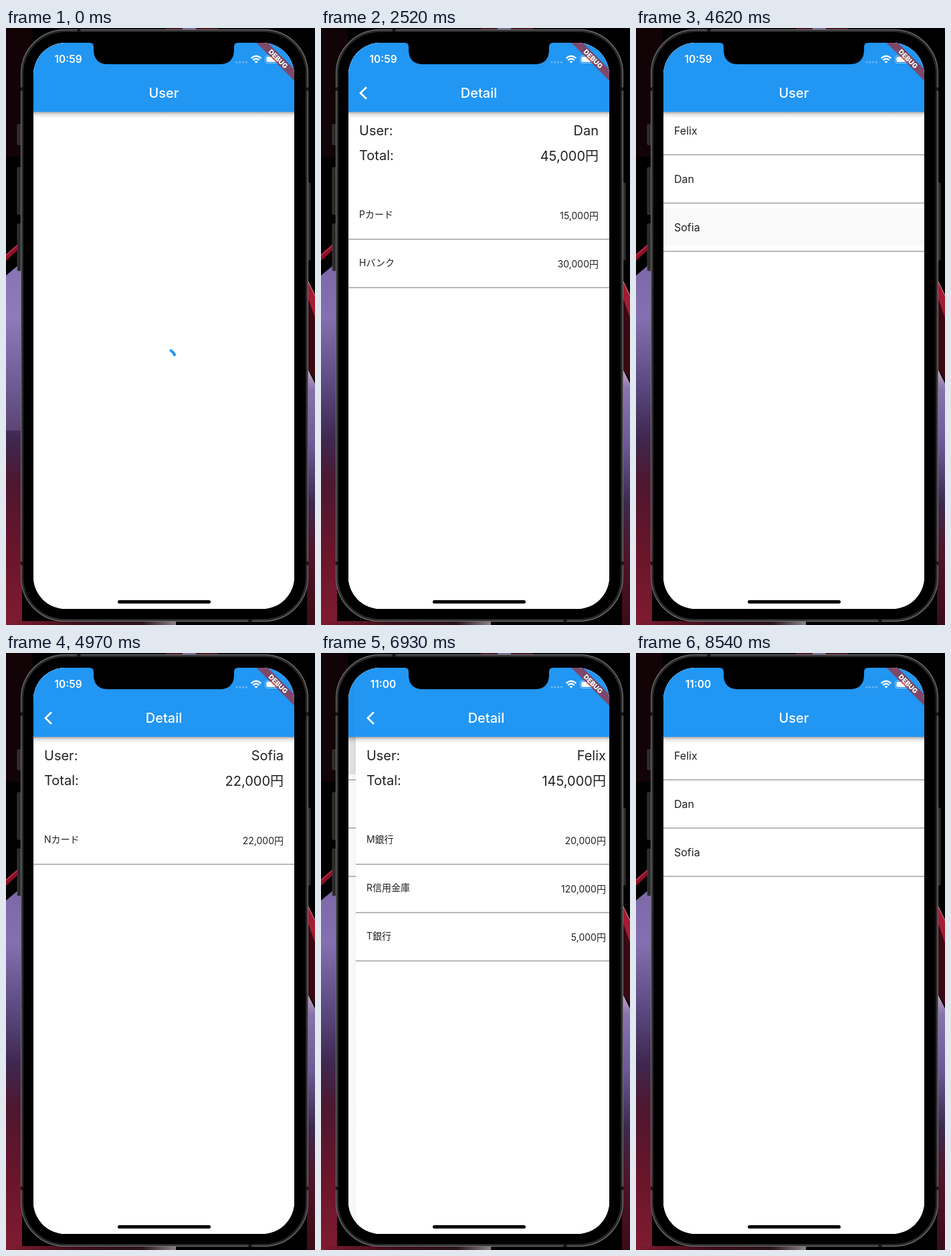
Recreate the animation shown at these times as an HTML page. Size 462 by 890 pixels, loop 9730 ms.

```html
<!DOCTYPE html>
<html lang="ja">
<head>
<meta charset="utf-8">
<title>User list demo</title>
<style>
html, body { margin: 0; width: 100%; height: 100%; overflow: hidden; background: #000; }
svg { display: block; width: 462px; height: 890px; }
text { font-family: Inter, "Noto Sans CJK JP", "Noto Sans CJK", sans-serif; fill: #212121; }
.bar { font-size: 20px; font-weight: 500; fill: #fff; text-anchor: middle; }
.big { font-size: 20px; }
.mid { font-size: 16px; }
.small { font-size: 14px; }
.end { text-anchor: end; }
</style>
</head>
<body>
<svg viewBox="0 0 462 890" xmlns="http://www.w3.org/2000/svg">
  <defs>
    <clipPath id="screen"><rect x="41" y="22" width="390" height="844" rx="48"/></clipPath>
    <clipPath id="barClip"><rect x="41" y="22" width="390" height="103"/></clipPath>
    <linearGradient id="barShade" x2="0" y2="1">
      <stop offset="0" stop-opacity=".34"/><stop offset=".4" stop-opacity=".12"/><stop offset="1" stop-opacity="0"/>
    </linearGradient>
    <linearGradient id="edgeShade">
      <stop offset="0" stop-opacity="0"/><stop offset="1" stop-opacity=".045"/>
    </linearGradient>
    <linearGradient id="wallLeft" gradientUnits="userSpaceOnUse" x1="0" y1="355" x2="0" y2="890">
      <stop offset="0" stop-color="#7d68a8"/><stop offset=".14" stop-color="#8470b0"/>
      <stop offset=".32" stop-color="#5c4c83"/><stop offset=".48" stop-color="#3f2850"/>
      <stop offset=".6" stop-color="#4d1730"/><stop offset=".8" stop-color="#69152a"/>
      <stop offset="1" stop-color="#7f1c31"/>
    </linearGradient>
    <linearGradient id="wallRight" gradientUnits="userSpaceOnUse" x1="0" y1="508" x2="0" y2="890">
      <stop offset="0" stop-color="#c9a9be"/><stop offset=".08" stop-color="#8873ae"/>
      <stop offset=".3" stop-color="#6c5996"/><stop offset=".52" stop-color="#3c2a4e"/>
      <stop offset=".72" stop-color="#4f1529"/><stop offset="1" stop-color="#3a0c18"/>
    </linearGradient>
    <linearGradient id="wallBottom">
      <stop offset="0" stop-color="#7f1c31"/><stop offset=".45" stop-color="#3a0d18"/>
      <stop offset=".8" stop-color="#2a1219"/><stop offset="1" stop-color="#8a8488"/>
    </linearGradient>
  </defs>

  <rect width="462" height="890" fill="#000"/>
  <rect width="40" height="192" fill="#120306"/>
  <path d="M239 0H317V4H239Z" fill="#4a1420"/>
  <path d="M264 0H284V4H264Z" fill="#77709a"/>
  <path d="M0 337L22 318V327L0 347Z" fill="#8d1026"/>
  <path d="M0 339L22 320" stroke="#d6506a" stroke-width="1"/>
  <path d="M0 369L24 349V890H0Z" fill="url(#wallLeft)"/>
  <path d="M450 374L462 399V524L450 506Z" fill="#3a0912"/>
  <path d="M450 374L462 399V432L450 398Z" fill="#a31d33"/>
  <path d="M450 374L462 399" stroke="#d98f98"/>
  <path d="M450 506L462 530V890H450Z" fill="url(#wallRight)"/>
  <rect y="884" width="254" height="6" fill="url(#wallBottom)"/>
  <path id="glow" d="M0 369L24 349V600H0Z" fill="#b49ade" opacity=".22"/>

  <g fill="#2b2b2c" stroke="#454546" stroke-width=".7">
    <rect x="17" y="144" width="7" height="30" rx="1"/>
    <rect x="17" y="208" width="7" height="70" rx="1"/>
    <rect x="17" y="292" width="7" height="70" rx="1"/>
    <rect x="449" y="231" width="6" height="115" rx="1"/>
  </g>
  <rect x="22" y="2" width="430" height="883" rx="66" fill="#2a2a2b"/>
  <rect x="22.6" y="2.6" width="428.8" height="881.8" rx="65.4" fill="none" stroke="#707071" stroke-width="1.2"/>
  <rect x="26" y="6" width="422" height="875" rx="62" fill="#000"/>
  <path d="M22 91H26M448 91H452M22 798H26M448 798H452M109 2V6M365 881V885" stroke="#151515" stroke-width="5"/>

  <g clip-path="url(#screen)">
    <rect x="41" y="22" width="390" height="844" fill="#fff"/>
    <g id="home">
      <rect x="41" y="22" width="390" height="844" fill="#fff"/>
      <rect id="press" x="41" width="390" height="56" fill="#bcbcbc"/>
      <g id="users"></g>
      <path id="homeSpin" fill="none" stroke="#2196f3" stroke-width="4"/>
      <rect x="41" y="125" width="390" height="9" fill="url(#barShade)"/>
      <rect x="41" y="22" width="390" height="103" fill="#2196f3"/>
      <text class="bar" x="236" y="104">User</text>
    </g>
    <g id="detail">
      <rect x="31" y="22" width="10" height="844" fill="url(#edgeShade)"/>
      <rect x="41" y="22" width="390" height="844" fill="#fff"/>
      <g id="info"></g>
      <path id="detailSpin" fill="none" stroke="#2196f3" stroke-width="4"/>
      <rect x="41" y="125" width="390" height="9" fill="url(#barShade)"/>
      <rect x="41" y="22" width="390" height="103" fill="#2196f3"/>
      <g clip-path="url(#barClip)">
        <circle id="ripple" cx="69" cy="97" r="35" fill="#c8c8c8" stroke="#d8d8d8" stroke-width="1"/>
      </g>
      <path d="M68 88.2L59 97L68 105.8" fill="none" stroke="#fff" stroke-width="2.7"/>
      <text class="bar" x="236" y="104">Detail</text>
    </g>

    <text id="clock" x="93" y="52.3" text-anchor="middle" style="font-size:15.5px;font-weight:600;fill:#fff"></text>
    <g fill="#fff" opacity=".3">
      <circle cx="345" cy="51" r="1.7"/><circle cx="349.8" cy="51" r="1.7"/>
      <circle cx="354.6" cy="51" r="1.7"/><circle cx="359.4" cy="51" r="1.7"/>
    </g>
    <g fill="none" stroke="#fff" stroke-width="2.2">
      <path d="M366.6 45.1Q374 38.4 381.4 45.1M369.2 48Q374 43.8 378.8 48"/>
      <path d="M374 52.6L371.4 50Q374 47.9 376.6 50Z" fill="#fff" stroke="none"/>
    </g>
    <rect x="387.5" y="41" width="23" height="11.5" rx="3.4" fill="none" stroke="#fff" stroke-opacity=".45"/>
    <rect x="389.3" y="42.8" width="19.4" height="7.9" rx="2" fill="#fff"/>
    <path d="M412 45Q414 46.8 412 48.6Z" fill="#fff" opacity=".5"/>
    <g transform="translate(431 22) rotate(45)">
      <rect x="-40" y="28" width="80" height="12" fill="#b71c1c" fill-opacity=".63"/>
      <text x="0" y="37.7" text-anchor="middle" style="font-size:10.2px;font-weight:900;fill:#fff;text-shadow:0 0 2px rgba(0,0,0,.6)">DEBUG</text>
    </g>
    <rect x="167" y="853" width="139" height="5" rx="2.5" fill="#000"/>
  </g>
  <path d="M125 21V22Q131 22 131 28V32Q131 54 153 54H319Q341 54 341 32V28Q341 22 347 22V21Z" fill="#000"/>
</svg>
<script>
const LOOP = 9730, STEP = 70, SLIDE = 300, LOADED = 770, RATE = 4 / 3;
const $ = id => document.getElementById(id);

const people = [
  { name: "Felix", total: "145,000円", rows: [["M銀行", "20,000円"], ["R信用金庫", "120,000円"], ["T銀行", "5,000円"]] },
  { name: "Dan", total: "45,000円", rows: [["Pカード", "15,000円"], ["Hバンク", "30,000円"]] },
  { name: "Sofia", total: "22,000円", rows: [["Nカード", "22,000円"]] }
];
// Each visit: who is opened, when the page slides in, when it slides out.
const visits = [
  { who: 1, open: 2175, close: 3800 },
  { who: 2, open: 4625, close: 5970 },
  { who: 0, open: 6728, close: 8210 }
];

const clamp = v => Math.min(1, Math.max(0, v));
const label = (cls, x, y, s) => `<text class="${cls}" x="${x}" y="${y}">${s}</text>`;
const divider = y => `<rect x="41" y="${y - .5}" width="390" height="1" fill="#747474"/>`;

function bezier(x1, y1, x2, y2) {
  const at = (a, b, s) => 3 * (1 - s) * (1 - s) * s * a + 3 * (1 - s) * s * s * b + s * s * s;
  return x => {
    if (x <= 0 || x >= 1) return clamp(x);
    let lo = 0, hi = 1;
    for (let i = 0; i < 24; i++) {
      const m = (lo + hi) / 2;
      if (at(x1, x2, m) < x) lo = m; else hi = m;
    }
    return at(y1, y2, lo);
  };
}
const slide = bezier(.35, .91, .33, .97);
const swift = bezier(.4, 0, .2, 1);

$("users").innerHTML = people.map((p, i) =>
  label("mid", 57, 159 + 72 * i, p.name) + divider(189 + 72 * i)).join("");

const infoOf = p =>
  label("big", 57, 160, "User:") + label("big end", 415, 160, p.name) +
  label("big", 57, 197, "Total:") + label("big end", 415, 198, p.total) +
  p.rows.map(([name, sum], i) => {
    const y = 72 * i;
    return label("small", 57, 283 + y, name) + label("small end", 415, 285 + y, sum) + divider(315 + y);
  }).join("");

// Indeterminate progress ring, age in ms.
function ring(age) {
  const phase = age % 1333 / 1333;
  const head = swift(clamp(phase * 2)), tail = swift(clamp(phase * 2 - 1));
  const from = 2 * Math.PI * (tail * .75 + age / 2222 + phase * .25) - Math.PI / 2;
  const sweep = Math.max(.01, (head - tail) * 1.5 * Math.PI);
  const pt = a => `${236 + 18 * Math.cos(a)} ${495.5 + 18 * Math.sin(a)}`;
  return `M${pt(from)}A18 18 0 ${sweep > Math.PI ? 1 : 0} 1 ${pt(from + sweep)}`;
}

const show = (el, on) => el.setAttribute("display", on ? "inline" : "none");
let shown = -1;

function draw(t) {
  show($("users"), t >= LOADED);
  show($("homeSpin"), t < LOADED);
  if (t < LOADED) $("homeSpin").setAttribute("d", ring(135 + t * RATE));
  $("glow").setAttribute("opacity", t < 2100 ? .22 : 0);
  $("clock").textContent = t < 5880 ? "10:59" : "11:00";

  const v = visits.find(v => t >= v.open - 10 && t < v.close + SLIDE);
  const p = v ? slide(clamp((t - v.open) / SLIDE)) - slide(clamp((t - v.close) / SLIDE)) : 0;
  $("home").setAttribute("transform", `translate(${-130 * p} 0)`);
  $("detail").setAttribute("transform", `translate(${390 * (1 - p)} 0)`);
  show($("detail"), p > 0);

  const pressed = v && t < v.open + SLIDE;
  show($("press"), pressed);
  if (!v) return;
  if (pressed) {
    $("press").setAttribute("y", 125 + 72 * v.who);
    $("press").setAttribute("opacity", .4 * clamp((t - v.open + 40) / 150));
  }
  if (shown !== v.who) {
    shown = v.who;
    $("info").innerHTML = infoOf(people[shown]);
  }
  const age = t - v.open, loading = age < 165;
  show($("info"), !loading);
  show($("detailSpin"), loading);
  if (loading) $("detailSpin").setAttribute("d", ring(Math.max(0, age) * RATE));
  const since = t - v.close + 25;
  $("ripple").setAttribute("opacity", since < 0 ? 0 : .34 * clamp(since / 70) * clamp((360 - since) / 200));
}

const begin = performance.now();
function tick() {
  const t = (performance.now() - begin) % LOOP;
  draw(Math.floor(t / STEP) * STEP);
  requestAnimationFrame(tick);
}
tick();
</script>
</body>
</html>
```
